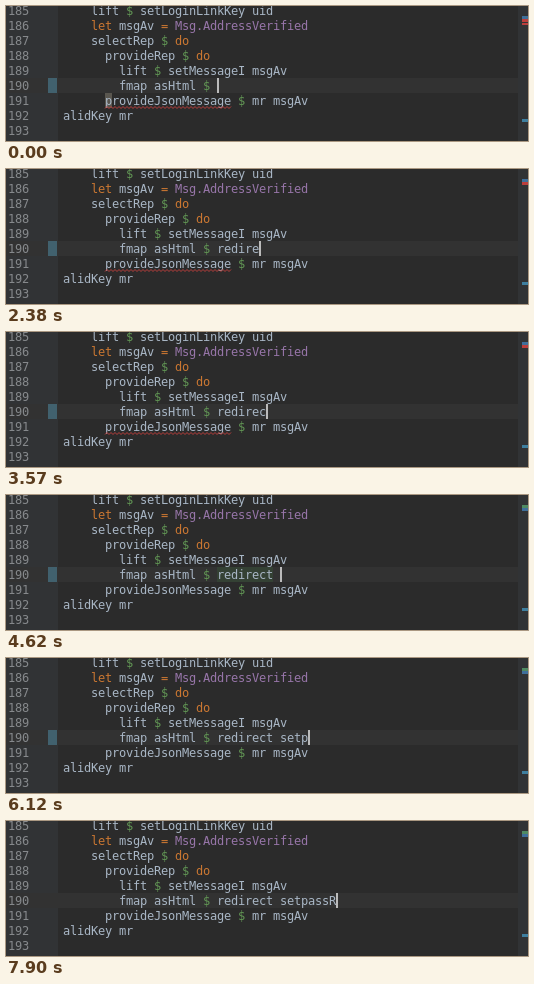
An HTML page with a canvas for the animation above (8 s loop, 522 by 135 pixels).

```html
<!DOCTYPE html>
<html lang="en">
<head>
<meta charset="utf-8">
<title>Code completion</title>
<style>
  html, body { margin: 0; width: 100%; height: 100%; overflow: hidden; background: #2b2b2b; }
  canvas { display: block; }
</style>
</head>
<body>
<canvas id="stage" width="522" height="135"></canvas>
<script>
const ctx = document.getElementById('stage').getContext('2d');
const LOOP = 8000, CELL = 7, LINE = 15, TOP = -3, LEFT = 57;
const INPUT_TOP = 72, INPUT_X = 211;
const color = {
  editor: '#2b2b2b', gutter: '#313335', line: '#323232', number: '#86898c',
  text: '#a9b7c6', keyword: '#cc7832', operator: '#629755', type: '#9876aa',
  error: '#bc3f3c', caret: '#bbbbbb', popup: '#3c3f41', selected: '#55585a',
  item: '#bbbbbb', dim: '#787878', match: '#d17ad6', modified: '#41616e'
};

const code = [
  '    lift $ setLoginLinkKey uid',
  '    let msgAv = Msg.AddressVerified',
  '    selectRep $ do',
  '      provideRep $ do',
  '        lift $ setMessageI msgAv',
  '        fmap asHtml $ ',
  '      provideJsonMessage $ mr msgAv',
  'alidKey mr',
  ''
];

// [time, typed text]
const typing = [
  [0, ''], [440, 'r'], [590, 're'], [890, 'red'], [1630, 'redi'], [1930, 'redir'],
  [2380, 'redire'], [3120, 'redirec'], [3720, 'redirect'], [4620, 'redirect '],
  [5070, 'redirect s'], [5370, 'redirect set'], [6120, 'redirect setp'],
  [6410, 'redirect setpa'], [6560, 'redirect setpas'], [7310, 'redirect setpassR']
];

// Each item: name, tail text, spaces before the tail, dimmed tail, further text
const popups = [
  { from: 2820, to: 3570, x: 211, items: [
    ['redirect', '  (MonadHandler m, RedirectUrl (Handler'],
    ['redirectToPost', '  (MonadHandler m, RedirectUrl'],
    ['redirectToReferer', '   YesodAuth master', ' (Yesod.Aut…']
  ] },
  { from: 6270, to: 7310, x: 274, items: [
    ['setpassR', ' (Yesod.Auth.Email)'],
    ['setPassword', '   YesodAuthEmail site =>'],
    ['setPasswordHandler', '    YesodAuthEmail site']
  ] }
];

const during = (t, from, to) => t >= from && t < to;

function rect(x, y, w, h, fill) {
  ctx.fillStyle = fill;
  ctx.fillRect(x, y, w, h);
}

// Draws on the fixed character grid and returns the x after the last cell.
function write(text, x, baseline, fill) {
  ctx.fillStyle = fill;
  for (const char of text) {
    ctx.fillText(char, x, baseline);
    x += CELL;
  }
  return x;
}

function writeCode(text, x, baseline) {
  for (const token of text.match(/\s+|\S+/g) || []) {
    const fill = /^(let|do|=)$/.test(token) ? color.keyword
      : token === '$' ? color.operator
      : token.startsWith('Msg.') ? color.type : color.text;
    x = write(token, x, baseline, fill);
  }
}

function squiggle(from, to, y) {
  ctx.beginPath();
  for (let x = from; x <= to; x += 2) ctx.lineTo(x, y + ((x - from) % 4 ? 0 : 2));
  ctx.strokeStyle = color.error;
  ctx.lineWidth = 1;
  ctx.stroke();
}

function drawStripe(t) {
  rect(512, 0, 10, 135, color.gutter);
  rect(516, 10, 6, 3, t < 4170 ? '#3f6f9a' : '#4f8a62');
  rect(516, 13, 6, 3, t < 4170 ? color.error : '#3f6f9a');
  if (t < 890) rect(516, 17, 6, 2, color.error);
  rect(516, 113, 6, 3, '#3f7f9f');
}

function drawPopup({ x, items }, prefixLength) {
  const left = x - 17, textX = x + 2;
  rect(left - 2, 86, 522, 49, 'rgba(0,0,0,.2)');
  rect(left, 87, 522, 48, color.popup);
  rect(left, 88, 522, 16, color.selected);
  items.forEach(([name, tail, hint = ''], row) => {
    const baseline = 101 + row * 15.5 | 0;
    rect(left + 4, baseline - 9, 10, 10, '#9a9c9e');
    let end = write(name.slice(0, prefixLength), textX, baseline, color.match);
    end = write(name.slice(prefixLength), end, baseline, color.item);
    end = write(hint, end, baseline, color.dim);
    write(tail, end, baseline, color.item);
  });
}

function draw(t) {
  const typed = typing.findLast(([time]) => time <= t)[1];
  const caretX = INPUT_X + typed.length * CELL;
  ctx.font = '12px "DejaVu Sans Mono", monospace';

  rect(0, 0, 522, 135, color.editor);
  rect(0, 0, 52, 135, color.gutter);
  rect(0, INPUT_TOP, 522, LINE, color.line);
  if (t < 7460) rect(42, INPUT_TOP, 9, LINE, color.modified);
  if (t < 890) rect(99, 87, CELL, LINE, '#59564f');
  if (during(t, 4170, 4920)) rect(INPUT_X, INPUT_TOP, 56, LINE, '#344134');

  code.forEach((text, i) => {
    const baseline = TOP + i * LINE + 12;
    write(String(185 + i), 2, baseline, color.number);
    writeCode(text, LEFT, baseline);
  });
  write(typed, INPUT_X, INPUT_TOP + 12, color.text);
  if (t < 4170) squiggle(99, 225, 100.5);

  drawStripe(t);
  const popup = popups.find(({ from, to }) => during(t, from, to));
  if (popup) drawPopup(popup, typed.split(' ').pop().length);
  if (!during(t, 300, 440) && !during(t, 7160, 7310)) {
    rect(caretX, INPUT_TOP, 2, LINE, color.caret);
  }
}

function tick() {
  draw(performance.now() % LOOP);
  requestAnimationFrame(tick);
}
tick();
</script>
</body>
</html>
```
